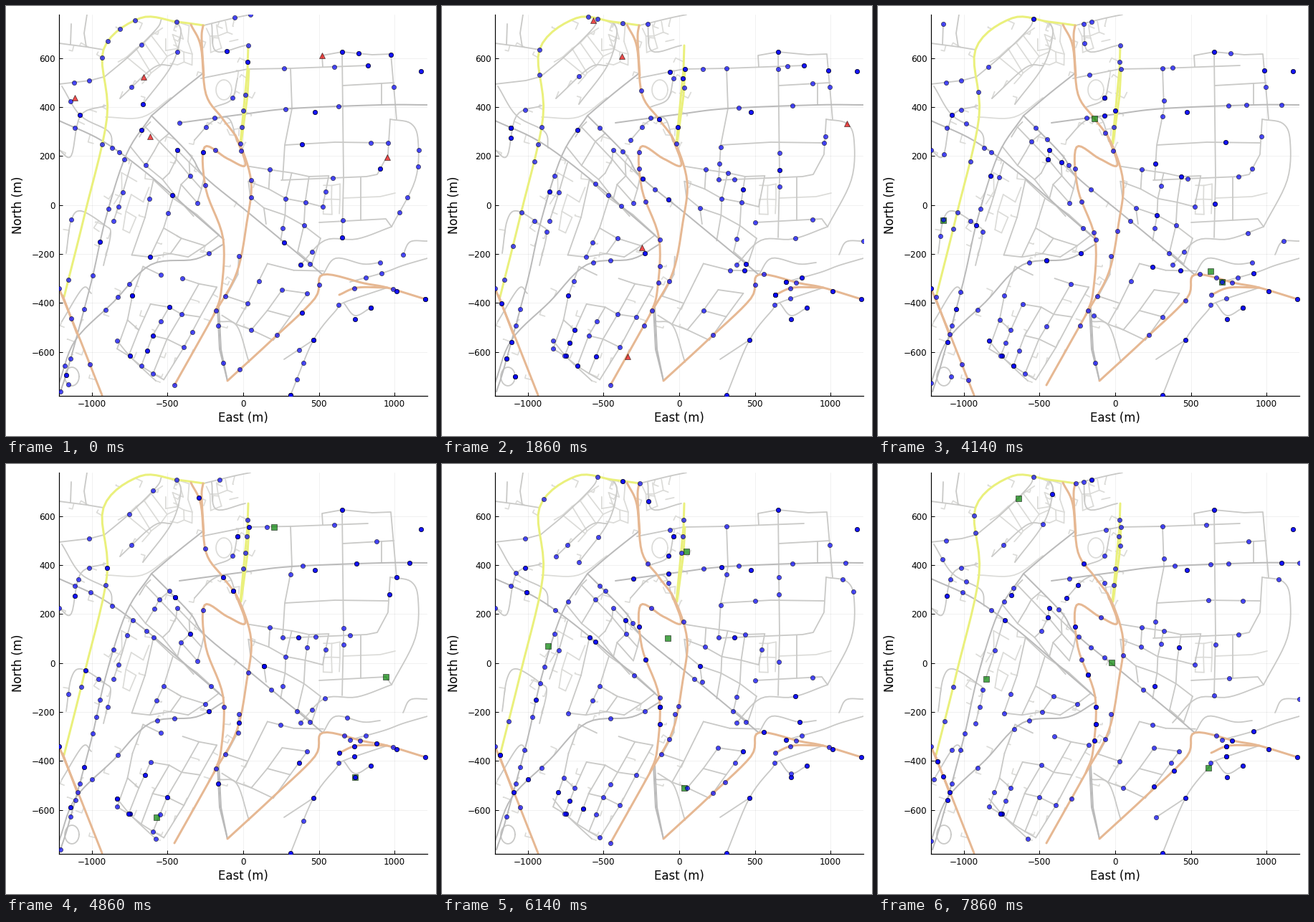
A matplotlib script for the animation above (8000 ms loop, 600x600 px).

```python
import numpy as np
import matplotlib.pyplot as plt
from matplotlib.animation import FuncAnimation
from matplotlib.collections import LineCollection

FRAMES = 56
LOOP_MS = 8000
RECOVERY = 25      # step at which triangles become squares
AGENTS = 165
PX = 0.72          # points per pixel at 100 dpi
LEFT, RIGHT, TOP, BOTTOM = 74, 588, 12, 543.5

plt.rcParams["font.family"] = "DejaVu Sans"
rng = np.random.default_rng(7)

STYLE = {          # colour, width in px
    "pale": ("#dbdbd8", 1.7),
    "minor": ("#c9c9c7", 1.8),
    "major": ("#bababa", 2.0),
    "yellow": ("#eaf07c", 3.0),
    "orange": ("#e6b893", 3.0),
}
streets = {kind: [] for kind in STYLE}


# ---------------------------------------------------------------- helpers
def road(kind, *xy):
    """Straight pieces through the given points."""
    streets[kind].append(np.reshape(xy, (-1, 2)).astype(float))


def curve(kind, *xy):
    """Smooth (Catmull-Rom) line through the given points."""
    p = np.reshape(xy, (-1, 2)).astype(float)
    p = np.vstack([2 * p[0] - p[1], p, 2 * p[-1] - p[-2]])
    t = np.linspace(0, 1, 8)[:, None]
    out = [0.5 * (2 * b + (c - a) * t + (2 * a - 5 * b + 4 * c - d) * t**2
                  + (3 * b - a - 3 * c + d) * t**3)
           for a, b, c, d in zip(p, p[1:], p[2:], p[3:])]
    streets[kind].append(np.vstack(out))


def ring(kind, x, y, rx, ry):
    t = np.linspace(0, 2 * np.pi, 25)
    streets[kind].append(np.c_[x + rx * np.cos(t), y + ry * np.sin(t)])


def block(kind, corners, nu, nv, keep=0.85, jitter=2.5):
    """Street grid in a four-cornered area, with some pieces left out."""
    a, b, c, d = np.reshape(corners, (4, 2)).astype(float)
    u = np.linspace(0, 1, nu)[:, None, None]
    v = np.linspace(0, 1, nv)[None, :, None]
    p = (1 - v) * ((1 - u) * a + u * b) + v * ((1 - u) * d + u * c)
    p += rng.normal(0, jitter, p.shape)
    for i in range(nu):
        for j in range(nv):
            if i + 1 < nu and rng.random() < keep:
                road(kind, p[i, j], p[i + 1, j])
            if j + 1 < nv and rng.random() < keep:
                road(kind, p[i, j], p[i, j + 1])


def along(line, step):
    """Points at even distances along a line."""
    s = np.r_[0, np.cumsum(np.hypot(*np.diff(line, axis=0).T))]
    at = np.linspace(0, s[-1], max(2, round(s[-1] / step) + 1))
    return np.c_[np.interp(at, s, line[:, 0]), np.interp(at, s, line[:, 1])]


# ---------------------------------------------------------------- main roads
curve("yellow", 276, 27, 238, 22, 187, 17, 136, 61, 141, 155, 110, 290, 81, 406)
road("yellow", 338, 55, 337, 88, 327, 192)
road("yellow", 339, 88, 337, 125, 328, 192)

curve("orange", 258, 26, 272, 57, 279, 123, 302, 157, 325, 190, 342, 245,
      336, 302, 322, 372, 290, 431, 235, 529)
curve("orange", 275, 27, 273, 45, 276, 97)
curve("orange", 320, 180, 334, 222, 309, 213, 277, 197, 279, 256, 303, 325,
      300, 400, 290, 431)
curve("orange", 309, 523, 371, 466, 431, 408, 442, 375, 500, 387, 532, 393,
      585, 409)
curve("orange", 465, 403, 490, 393, 532, 393)
road("orange", 74, 394, 104, 467, 134, 543)
road("orange", 79, 404, 99, 457)

curve("major", 203, 153, 256, 207, 277, 238, 339, 289, 409, 347, 442, 375)
curve("major", 203, 153, 168, 207, 139, 297, 119, 385, 88, 500, 76, 538)
curve("major", 74, 160, 134, 188, 195, 232, 267, 294, 304, 326)
curve("major", 203, 153, 237, 124, 276, 93)
curve("major", 242, 163, 331, 151, 399, 143, 524, 138, 588, 138)
curve("major", 74, 526, 97, 466, 150, 413, 202, 361, 265, 353, 304, 332)
for x in (295, 297):
    road("major", x, 420, x + 3, 479, 309, 523)

# ---------------------------------------------------------------- side streets
# north-east
road("minor", 272, 101, 337, 88, 397, 87, 505, 83)
road("minor", 442, 85, 441, 69, 469, 64, 511, 68, 537, 67, 545, 158)
road("minor", 469, 64, 471, 239, 469, 323)
road("minor", 397, 87, 399, 143, 389, 194, 386, 242)
road("minor", 470, 111, 541, 107)
road("minor", 524, 108, 524, 138)
road("minor", 389, 194, 459, 190, 533, 191)
road("minor", 384, 243, 503, 238, 518, 235, 533, 207, 536, 158)
curve("minor", 536, 158, 565, 164, 575, 188, 571, 243, 538, 308)
road("minor", 437, 302, 530, 297, 538, 308)
road("minor", 495, 239, 495, 299)
road("pale", 471, 268, 522, 266, 543, 261)
block("pale", [443, 250, 466, 249, 466, 290, 443, 291], 3, 3, jitter=0.7)

# south-east
curve("minor", 480, 385, 527, 372, 554, 362, 588, 352)
curve("minor", 554, 347, 564, 329, 588, 328)
curve("minor", 397, 543, 429, 466, 461, 424, 471, 414, 532, 393)
road("minor", 388, 493, 429, 466)
curve("minor", 471, 414, 487, 432, 509, 421)
curve("minor", 538, 308, 490, 325, 445, 327, 411, 361)
curve("minor", 442, 375, 460, 352, 498, 360, 522, 358)

# centre
block("minor", [343, 225, 450, 240, 430, 362, 336, 290], 5, 4)
block("minor", [327, 349, 442, 375, 371, 466, 300, 432], 4, 4)
curve("minor", 298, 440, 322, 446, 339, 497)

# north
curve("minor", 276, 27, 317, 17, 341, 12)
curve("minor", 287, 25, 293, 63, 334, 55)
curve("minor", 191, 137, 231, 83, 244, 38, 238, 22)
curve("minor", 136, 100, 174, 68, 210, 32, 217, 18)
curve("minor", 159, 129, 206, 86, 231, 83)
curve("minor", 291, 141, 315, 130, 323, 101)
curve("minor", 263, 187, 288, 161, 311, 157, 322, 189)
ring("pale", 304, 117, 11, 14)
curve("pale", 139, 155, 190, 155, 230, 128)
block("pale", [160, 80, 215, 32, 238, 64, 186, 110], 6, 2)
block("pale", [222, 24, 256, 30, 262, 84, 228, 78], 4, 4, 0.6)
block("pale", [281, 28, 318, 22, 320, 48, 288, 62], 4, 3, 0.7)
block("pale", [304, 164, 325, 160, 325, 182, 312, 180], 3, 3, 0.7, 1)

# north-west
road("minor", 74, 52, 112, 57, 136, 61)
road("minor", 91, 25, 90, 54)
road("minor", 113, 12, 109, 38, 112, 57)
road("minor", 74, 109, 117, 104, 136, 99)
curve("minor", 78, 112, 104, 153, 143, 175, 148, 198)
curve("minor", 139, 139, 104, 153, 91, 209, 74, 201)

# west
curve("minor", 84, 345, 91, 299, 105, 286, 138, 306, 146, 318, 136, 362)
curve("minor", 78, 440, 107, 394, 119, 401)
ring("minor", 92, 517, 10, 13)
curve("minor", 175, 219, 160, 270, 150, 300)
block("minor", [205, 158, 277, 238, 262, 292, 176, 195], 5, 4)
block("minor", [209, 246, 294, 318, 255, 353, 175, 345], 4, 3)
block("minor", [192, 366, 298, 395, 222, 520, 155, 480], 5, 4)
block("pale", [165, 235, 200, 255, 175, 315, 145, 300], 3, 4, 0.5)
curve("minor", 155, 467, 176, 492, 209, 523)

# ---------------------------------------------------------------- nodes
nodes = []
for kind in ("yellow", "orange", "major", "minor"):
    for line in streets[kind]:
        for p in along(line, 24):
            inside = LEFT <= p[0] <= RIGHT and TOP <= p[1] <= BOTTOM
            if inside and all(np.hypot(*(p - q)) > 9 for q in nodes):
                nodes.append(p)
nodes = np.array(nodes)

# short dead ends off the western streets
west = nodes[nodes[:, 0] < 345]
for p in west[rng.choice(len(west), 90, replace=False)]:
    a = rng.choice([0.35, 1.9, 3.5, 5.05]) + rng.normal(0, 0.12)
    u = np.array([np.cos(a), np.sin(a)])
    q = p + u * rng.uniform(6, 13)
    bend = np.array([-u[1], u[0]]) * rng.uniform(-9, 9)
    road("pale", p, q, q + bend)

# ---------------------------------------------------------------- agents
# every agent steps to one of the nodes around it
gap = np.linalg.norm(nodes[:, None] - nodes, axis=2)
near = np.argsort(gap, axis=1)[:, 1:7]
walk = [rng.choice(len(nodes), AGENTS)]
for _ in range(FRAMES - 1):
    walk.append(near[walk[-1], rng.integers(0, 6, AGENTS)])

# dead ends where agents pile up
resting = np.array([(509, 421), (487, 437), (397, 543), (545, 398), (579, 91),
                    (469, 64), (429, 466), (173, 488), (585, 409), (431, 148)])

STEPS = [0, 13, 20, 28, 34, 42, 55]
cases = [
    [(192, 99), (251, 70), (334, 340), (302, 157), (374, 88), (341, 122),
     (196, 48)],
    [(201, 182), (259, 489), (337, 455), (91, 299), (210, 493), (148, 254),
     (151, 300)],
    [(441, 69), (279, 337), (378, 364), (464, 370), (530, 297), (315, 243),
     (326, 277)],
    [(532, 211), (565, 164), (426, 266), (480, 385), (487, 437), (338, 452),
     (461, 424)],
    [(96, 128), (211, 20), (253, 419)],
]


def case_at(track, k):
    """Exact place at a key step, else the node closest to the way between."""
    keys = STEPS[:len(track)]
    p = np.array([np.interp(k, keys, c) for c in zip(*track)])
    if k in keys:
        return p
    return nodes[np.argmin(np.linalg.norm(nodes - p, axis=1))]


# ---------------------------------------------------------------- stage
fig = plt.figure(figsize=(6, 6), dpi=100, facecolor="white")
ax = fig.add_axes([LEFT / 600, 1 - BOTTOM / 600,
                   (RIGHT - LEFT) / 600, (BOTTOM - TOP) / 600])
ax.set_xlim(LEFT, RIGHT)
ax.set_ylim(BOTTOM, TOP)


def minus(v):
    return str(v).replace("-", "\u2212")


xt = range(-1000, 1001, 500)
yt = range(-600, 601, 200)
ax.set_xticks([331 + 0.2111 * v for v in xt], [minus(v) for v in xt])
ax.set_yticks([277.7 - 0.3417 * v for v in yt], [minus(v) for v in yt])
ax.tick_params(direction="in", length=5 * PX, width=PX, pad=5.5 * PX,
               labelsize=12 * PX)
ax.set_axisbelow(True)
ax.grid(color="black", alpha=0.08, lw=0.7 * PX)
ax.spines[["top", "right"]].set_visible(False)
ax.spines[["left", "bottom"]].set_linewidth(1.2 * PX)
fig.text(331 / 600, 1 - 575 / 600, "East (m)", size=16.5 * PX,
         ha="center", va="center")
fig.text(16.5 / 600, 1 - 277.5 / 600, "North (m)", size=16.5 * PX,
         ha="center", va="center", rotation=90)

for z, (kind, (color, width)) in enumerate(STYLE.items()):
    ax.add_collection(LineCollection(
        streets[kind], colors=color, linewidths=width * PX,
        capstyle="round", joinstyle="round", zorder=2 + 0.1 * z))


def markers(shape, color, size, z):
    return ax.plot([], [], shape, color=color, ms=size * PX, mec="black",
                   mew=0.7 * PX, alpha=0.7, zorder=z)[0]


squares = markers("s", "green", 8, 4)
dots = markers("o", "blue", 6.2, 5)
triangles = markers("^", "#e60000", 8.2, 6)


def draw(k):
    dots.set_data(*np.vstack([resting, resting, nodes[walk[k]]]).T)
    ill = k < RECOVERY
    spots = np.array([case_at(c, k) for c in (cases if ill else cases[:4])])
    triangles.set_data(*(spots.T if ill else ([], [])))
    squares.set_data(*(([], []) if ill else spots.T))
    return squares, dots, triangles


anim = FuncAnimation(fig, draw, frames=FRAMES, interval=LOOP_MS / FRAMES,
                     repeat=True, repeat_delay=0, blit=False)
plt.show()
```
